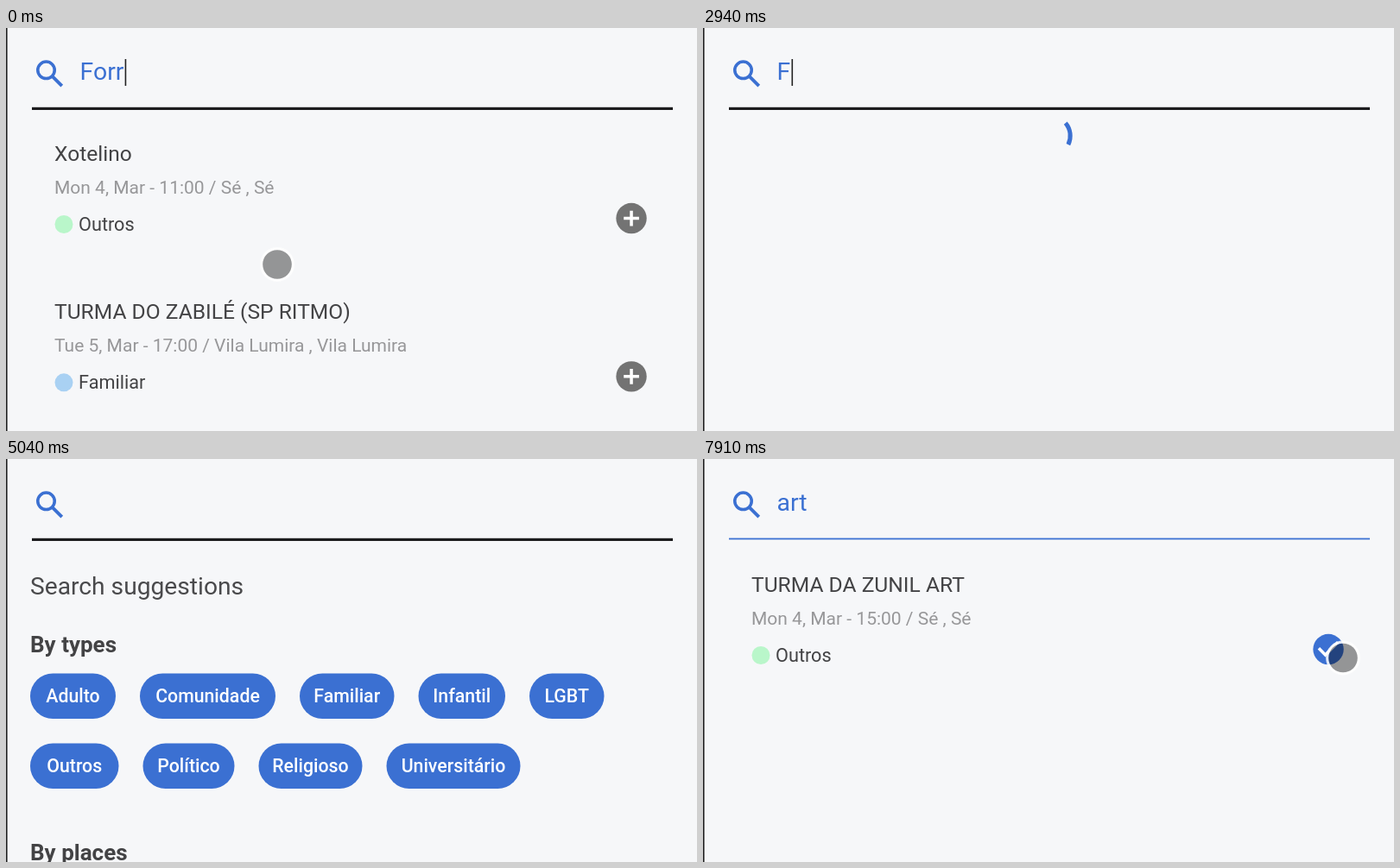
An HTML page for the animation above (8 s loop, 800 by 467 pixels).

```html
<!DOCTYPE html>
<html lang="en">
<head>
<meta charset="utf-8">
<title>Event search</title>
<style>
  html, body { margin: 0; width: 100%; height: 100%; overflow: hidden; background: #f6f7f9; }
  svg { display: block; width: 800px; height: 467px; font-family: Roboto, "Open Sans", sans-serif; fill: #434345; }
  .query { font-size: 28.4px; fill: #3b70d2; }
  .title { font-size: 24.6px; }
  .when { font-size: 21px; fill: #979799; }
  .kind { font-size: 21.7px; }
  .lead { font-size: 28.2px; fill: #4a4a4c; }
  .head { font-size: 26px; font-weight: 700; }
  .chip { font-size: 21.3px; font-weight: 500; fill: #fff; text-anchor: middle; }
  .blue { fill: #3b70d2; }
  .line { fill: none; stroke: #3b70d2; }
</style>
</head>
<body>
<svg viewBox="0 0 800 467">
  <rect width="800" height="467" fill="#f6f7f9"/>
  <rect width="1.6" height="467" fill="#232323"/>
  <g class="line" stroke-width="2" transform="translate(29.7 32) scale(1.77)">
    <circle cx="9.5" cy="9.5" r="5.5"/>
    <path d="M13.6 13.6 19.8 19.8" stroke-width="2.2"/>
  </g>
  <text id="query" class="query" x="85.6" y="60"></text>
  <rect id="caret" y="36" width="1.6" height="31" fill="#222"/>
  <rect id="rule" x="30" width="742"/>
  <g id="list"></g>
  <g id="found"></g>
  <g id="hints"></g>
  <circle id="spinner" class="line" cx="402" cy="125" r="23.2" stroke-width="5" pathLength="360"/>
  <g id="pointer">
    <circle r="18.3" fill="none" stroke="#fff" stroke-opacity=".85" stroke-width="3.2"/>
    <circle r="16.8" fill="#000" fill-opacity=".4"/>
  </g>
</svg>
<script>
const $ = id => document.getElementById(id);
const text = (cls, x, y, s) => `<text class="${cls}" x="${x}" y="${y}">${s}</text>`;

// One search result; the icon glyph is drawn on a 24-unit grid.
const PLUS = 'M17 13h-4v4h-2v-4H7v-2h4V7h2v4h4v2z';
const CHECK = 'M10 17l-5-5 1.41-1.41L10 14.17l7.59-7.59L19 8z';
const button = (glyph, color) => `<g transform="translate(702.8 199.3) scale(1.77)">
  <circle cx="12" cy="12" r="10" fill="${color}"/><path d="${glyph}" fill="#fff"/></g>`;
const add = button(PLUS, '#737373');
const card = (y, title, when, kind, color, icon) => `<g transform="translate(0 ${y})">
  ${text('title', 56, 153.5, title)}${text('when', 56, 192, when)}
  <circle cx="67" cy="227.5" r="10.5" fill="${color}"/>${text('kind', 84, 234.5, kind)}${icon}</g>`;

const chip = (y, x, right, label) =>
  `<rect class="blue" x="${x}" y="${y}" width="${right - x}" height="52.5" rx="26.2"/>` +
  text('chip', (x + right) / 2, y + 33.5, label);

$('list').innerHTML =
  card(0, 'Xotelino', 'Mon 4, Mar - 11:00 / Sé , Sé', 'Outros', '#b9f6ca', add) +
  card(183.3, 'TURMA DO ZABILÉ (SP RITMO)', 'Tue 5, Mar - 17:00 / Vila Lumira , Vila Lumira', 'Familiar', '#a9d1f3', add);

$('found').innerHTML =
  card(0, 'TURMA DA ZUNIL ART', 'Mon 4, Mar - 15:00 / Sé , Sé', 'Outros', '#b9f6ca',
    `<g id="add">${add}</g><g id="done">${button(CHECK, '#3b70d2')}</g>`);

$('hints').innerHTML =
  text('lead', 28, 157, 'Search suggestions') +
  text('head', 28, 224, 'By types') + text('head', 28, 465, 'By places') +
  [[28, 127, 'Adulto'], [155, 312, 'Comunidade'], [340, 449.5, 'Familiar'],
   [477.5, 578, 'Infantil'], [606, 692.5, 'LGBT']].map(c => chip(248.5, ...c)).join('') +
  [[28, 130.5, 'Outros'], [158.5, 264.5, 'Político'], [292.5, 412.5, 'Religioso'],
   [440.5, 595.5, 'Universitário']].map(c => chip(329.5, ...c)).join('');

const LOOP = 8000, CLEARED = 3090, TYPED = 5550, LOADED = 6440, CLICK = 7770;
// [time, field content]; every key press restarts the caret blink
const keys = [[-50, 'Forr'], [2660, 'For'], [2800, 'Fo'], [2940, 'F'], [CLEARED, ''],
  [TYPED, 'a'], [5720, 'ar'], [5900, 'art']];
// [time, x, y]
const path = [[0, 314, 274], [70, 314, 274], [210, 322, 264], [350, 322, 264], [560, 350, 236],
  [770, 350, 236], [1190, 490, 197], [1540, 430, 168], [1610, 430, 168], [1960, 356, 142],
  [2380, 457, 122], [6720, 457, 122], [6930, 551, 155], [7140, 658, 197], [7280, 658, 197],
  [7600, 741, 230.5], [LOOP, 741, 230.5]];

const show = (id, on) => $(id).style.display = on ? '' : 'none';
const set = (id, attrs) => { for (const k in attrs) $(id).setAttribute(k, attrs[k]); };

function draw(t) {
  const [pressed, value] = keys.findLast(k => k[0] <= t);
  const focused = t < CLICK;
  $('query').textContent = value;
  set('caret', { x: value ? 86.8 + $('query').getComputedTextLength() : 86.8 });
  show('caret', focused && (t - pressed) % 1000 < 500);
  set('rule', focused ? { y: 91.8, height: 3.2, fill: '#1c1c1e' } : { y: 91.6, height: 1.8, fill: '#3b70d2' });

  show('list', t < keys[1][0]);
  show('hints', t >= CLEARED && t < TYPED);
  show('found', t >= LOADED);
  show('add', focused);
  show('done', !focused);

  const spin = t - 6090;
  const sweep = 153 + 134 * Math.cos(spin * 2 * Math.PI / 1333);
  show('spinner', t >= keys[1][0] && t < CLEARED || t >= TYPED && t < LOADED);
  set('spinner', { 'stroke-dasharray': `${sweep} 360`, transform: `rotate(${90 + spin * 0.27} 402 125)` });

  const i = path.findIndex(p => p[0] > t);
  const [a, b] = [path[i - 1], path[i]];
  const u = (t - a[0]) / (b[0] - a[0]);
  const at = n => a[n] + (b[n] - a[n]) * u;
  show('pointer', t < keys[1][0] || t >= 6790);
  set('pointer', { transform: `translate(${at(1)} ${at(2)})` });
}

const start = performance.now();
function tick() {
  draw((performance.now() - start) % LOOP);
  requestAnimationFrame(tick);
}
tick();
</script>
</body>
</html>
```
